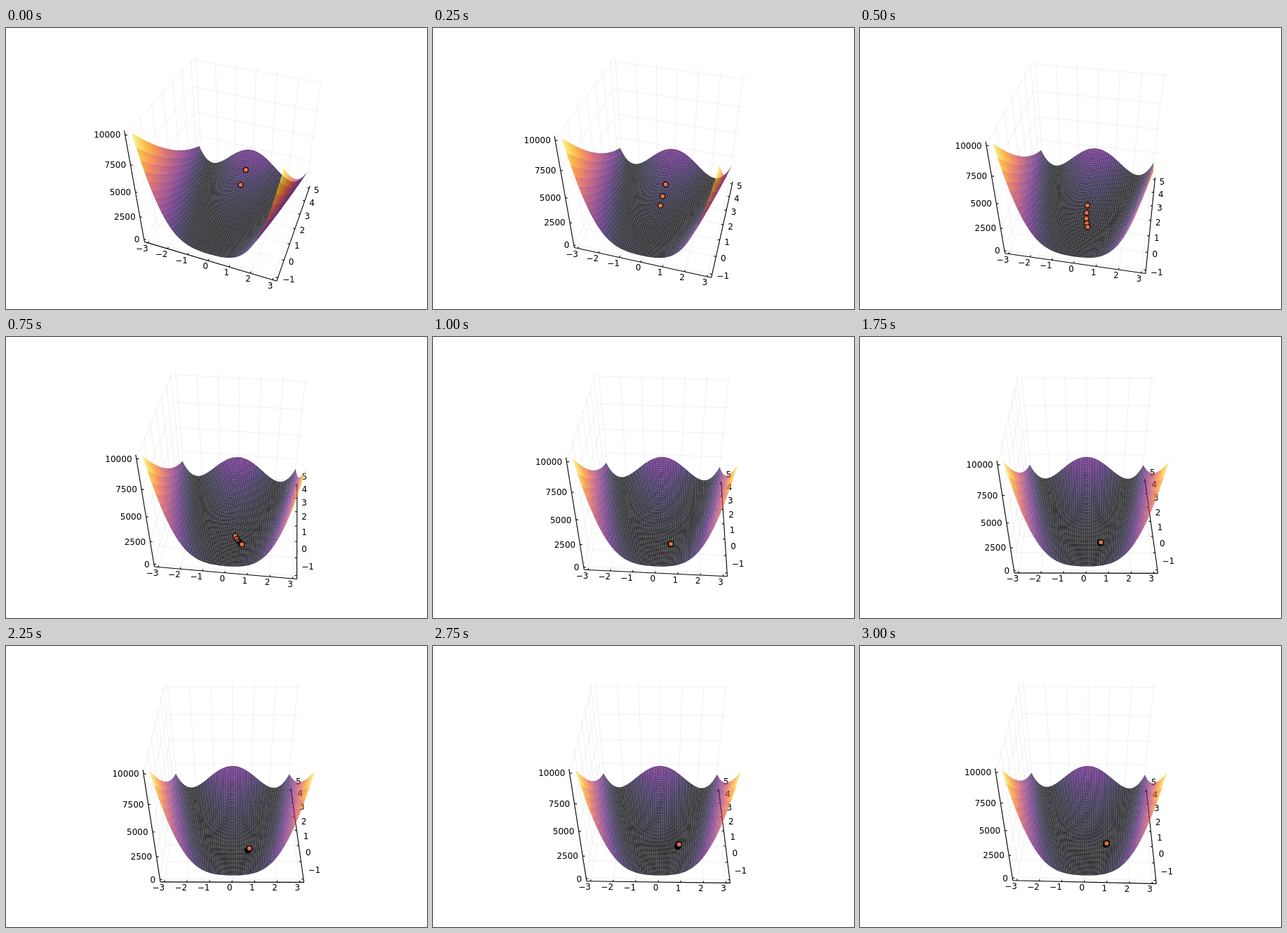
These frames come from a looping animation (600x400 px, 3250 ms). An HTML page with a canvas:

```html
<!DOCTYPE html>
<html lang="en">
<head>
<meta charset="utf-8">
<title>Gradient descent on a surface</title>
<style>
  html, body { margin: 0; width: 100%; height: 100%; overflow: hidden; background: #fff; }
  canvas { display: block; }
</style>
</head>
<body>
<canvas id="stage" width="600" height="400"></canvas>
<script>
const ctx = document.getElementById('stage').getContext('2d');
const STEP = 250;
// camera azimuth in degrees for each step
const AZIMUTH = [20, 15.1, 10.1, 6.1, 3.3, 1.6, 0.7, 0.2, 0, 0.2, 0.5, 0.9, 1.6];
const ELEVATION = 40 * Math.PI / 180;
const DISTANCE = Math.sqrt(3) / Math.sin(Math.PI / 12);
const FOCAL = 672, CX = 322.6, CY = 192;
const CELLS = 60;
const Z_MAX = 10016;
const X_TICKS = [-3, -2, -1, 0, 1, 2, 3];
const Y_TICKS = [-1, 0, 1, 2, 3, 4, 5];
const Z_TICKS = [0, 2500, 5000, 7500, 10000];
const INFERNO = [
  [0, 0, 4], [22, 11, 57], [66, 10, 104], [106, 23, 110], [147, 38, 103],
  [188, 55, 84], [221, 81, 58], [243, 120, 25], [252, 165, 10], [246, 215, 70], [252, 255, 164]
];

const height = (x, y) => (1 - x) ** 2 + 100 * (y - x * x) ** 2;

// data to the cube -1..1, with 3% room on each side
const nx = x => x / 3.18;
const ny = y => (y - 2) / 3.18;
const nz = z => (z / Z_MAX * 2 - 1) / 1.06;

function color(t) {
  const p = Math.min(Math.max(t, 0), 1) * 10;
  const i = Math.min(Math.floor(p), 9);
  const mix = INFERNO[i].map((c, j) => Math.round(c + (INFERNO[i + 1][j] - c) * (p - i)));
  return `rgba(${mix},0.8)`;
}

function makeCamera(degrees) {
  const a = degrees * Math.PI / 180;
  const sa = Math.sin(a), ca = Math.cos(a);
  const se = Math.sin(ELEVATION), ce = Math.cos(ELEVATION);
  return (x, y, z) => {
    const side = ca * x + sa * y;
    const away = ca * y - sa * x;
    const depth = DISTANCE + ce * away - se * z;
    const k = FOCAL / depth;
    return { x: CX + side * k, y: CY - (se * away + ce * z) * k, depth };
  };
}

// descent path with a fixed step size
const path = [[0.002, 4]];
while (path.length < 8192) {
  const [x, y] = path[path.length - 1];
  const u = y - x * x;
  path.push([x + 0.001 * (2 * (1 - x) + 400 * x * u), y - 0.2 * u]);
}

const nodes = [];
for (let j = 0; j <= CELLS; j++) {
  for (let i = 0; i <= CELLS; i++) {
    const x = -3 + 6 * i / CELLS, y = -1 + 6 * j / CELLS;
    nodes.push([x, y, height(x, y)]);
  }
}
const cells = [];
for (let j = 0; j < CELLS; j++) {
  for (let i = 0; i < CELLS; i++) {
    const n = j * (CELLS + 1) + i;
    const ids = [n, n + 1, n + CELLS + 2, n + CELLS + 1];
    const mean = ids.reduce((sum, id) => sum + nodes[id][2], 0) / 4;
    cells.push({ ids, x: nx(nodes[n][0] + 3 / CELLS), y: ny(nodes[n][1] + 3 / CELLS), fill: color(mean / Z_MAX) });
  }
}

function line(a, b) {
  ctx.beginPath();
  ctx.moveTo(a.x, a.y);
  ctx.lineTo(b.x, b.y);
  ctx.stroke();
}

function drawGrid(cam) {
  ctx.strokeStyle = 'rgba(0,0,0,0.06)';
  ctx.lineWidth = 1;
  for (const t of X_TICKS.map(nx)) {
    line(cam(t, -1, -1), cam(t, 1, -1));
    line(cam(t, 1, -1), cam(t, 1, 1));
  }
  for (const t of Y_TICKS.map(ny)) {
    line(cam(-1, t, -1), cam(1, t, -1));
    line(cam(-1, t, -1), cam(-1, t, 1));
  }
  for (const t of Z_TICKS.map(nz)) {
    line(cam(-1, -1, t), cam(-1, 1, t));
    line(cam(-1, 1, t), cam(1, 1, t));
  }
}

function label(text, p, dx, dy, align) {
  ctx.textAlign = align;
  ctx.fillText(String(text).replace('-', '\u2212'), p.x + dx, p.y + dy + 4.4);
}

function drawAxes(cam) {
  const tick = 0.03;
  ctx.strokeStyle = ctx.fillStyle = '#000';
  ctx.lineWidth = 1.1;
  ctx.font = '12px "DejaVu Sans", sans-serif';
  const front = cam(1, -1, -1), back = cam(1, 1, -1);
  line(cam(-1, -1, -1), front);
  line(front, back);
  line(cam(-1, -1, -1), cam(-1, -1, 1));

  for (const v of X_TICKS) {
    const p = cam(nx(v), -1, -1);
    line(p, cam(nx(v), -1 + tick, -1));
    label(v, p, 0.3, 7.7, 'right');
  }
  // labels move up once the side axis leans to the left
  const dy = back.x > front.x + 1 ? 2.3 : -13.3;
  for (const v of Y_TICKS) {
    const p = cam(1, ny(v), -1);
    line(p, cam(1 - tick, ny(v), -1));
    label(v, p, 6.6, dy, 'left');
  }
  for (const v of Z_TICKS) {
    const p = cam(-1, -1, nz(v));
    line(p, cam(-1 + tick, -1, nz(v)));
    label(v, p, -6.3, 0, 'right');
  }
}

function drawSurface(cam) {
  const pts = nodes.map(([x, y, z]) => cam(nx(x), ny(y), nz(z)));
  const order = cells.map(cell => ({ cell, depth: cam(cell.x, cell.y, 0).depth }));
  order.sort((a, b) => b.depth - a.depth);
  for (const { cell } of order) {
    ctx.fillStyle = cell.fill;
    ctx.beginPath();
    for (const id of cell.ids) ctx.lineTo(pts[id].x, pts[id].y);
    ctx.fill();
  }
}

function drawDots(cam, step) {
  ctx.fillStyle = '#e36f47';
  ctx.strokeStyle = '#000';
  ctx.lineWidth = 1.2;
  for (const [x, y] of path.slice(2 ** step - 1, 2 ** (step + 1))) {
    const p = cam(nx(x), ny(y), nz(height(x, y)));
    ctx.beginPath();
    ctx.arc(p.x, p.y, 3.6, 0, 2 * Math.PI);
    ctx.fill();
    ctx.stroke();
  }
}

function draw(step) {
  const cam = makeCamera(AZIMUTH[step]);
  ctx.fillStyle = '#fff';
  ctx.fillRect(0, 0, 600, 400);
  drawGrid(cam);
  drawAxes(cam);
  drawSurface(cam);
  drawDots(cam, step);
}

let shown = -1;
const start = performance.now();
function tickFrame() {
  const step = Math.floor((performance.now() - start) / STEP) % AZIMUTH.length;
  if (step !== shown) draw(shown = step);
  requestAnimationFrame(tickFrame);
}
tickFrame();
</script>
</body>
</html>
```
